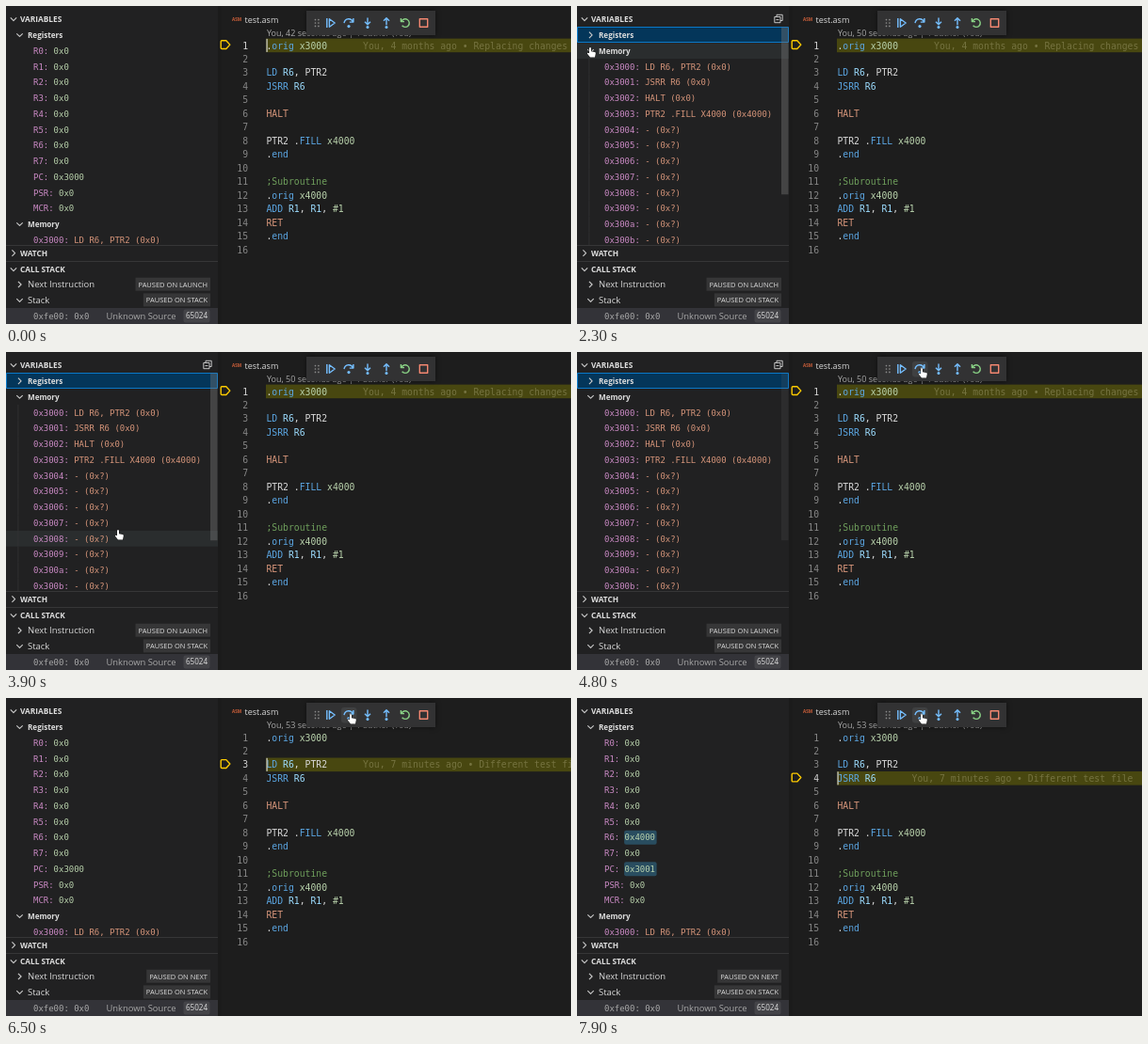
An HTML page with a canvas for the animation above (8000 ms loop, 600x338 px).

```html
<!DOCTYPE html>
<html lang="en">
<head>
<meta charset="utf-8">
<title>Debugger session</title>
<style>
html, body { margin: 0; width: 100%; height: 100%; overflow: hidden; background: #1d1d1d; }
canvas { display: block; width: 600px; height: 338px; }
</style>
</head>
<body>
<canvas id="stage"></canvas>
<script>
const W = 600, H = 338, LOOP = 8000;
const ROW = 16.75, LINE = 14.47, TREE_TOP = 22.5, TREE_BOTTOM = 254;
const MONO = '"DejaVu Sans Mono", "Noto Sans Mono", monospace';
const SANS = '"Open Sans", "Noto Sans", sans-serif';
const CODE_FONT = '9.75px ' + MONO;
const TREE_FONT = '8.97px ' + MONO;
const HEAD_FONT = '700 8.3px ' + SANS;
const UI_FONT = '9.5px ' + SANS;
const COL = {
  side: '#212122', editor: '#1d1d1d', text: '#d8d8d8', dim: '#858585', line: '#363637',
  blue: '#5ba6e2', reg: '#9cdcfe', num: '#b9d2ac', str: '#d6957a', name: '#cb8ac5',
  note: '#6f9f5c', focus: '#0a78c8', icon: '#75beff', gold: '#ffcc00'
};

// Moments of the session, in ms
const T = { focus: 1600, collapse: 1850, step1: 5100, blame1: 5800, step2: 7000, blame2: 7200 };
const PATH = [[700, 110, 345], [1300, 13, 38], [1500, 13, 29], [2050, 13, 29], [2200, 13, 44],
  [2450, 13, 44], [2950, 118, 189], [3900, 118, 189], [4600, 365, 17], [LOOP, 365, 17]];
const SCROLL = [[0, 0], [3000, 38], [3150, 70], [3500, 32], [3700, 0]];

const CODE = [
  [['.', 'text'], ['orig ', 'blue'], ['x3000', 'num']],
  [],
  [['LD ', 'blue'], ['R6', 'reg'], [', PTR2', 'text']],
  [['JSRR ', 'blue'], ['R6', 'reg']],
  [],
  [['HALT', 'str']],
  [],
  [['PTR2 .', 'text'], ['FILL ', 'blue'], ['x4000', 'num']],
  [['.', 'text'], ['end', 'blue']],
  [],
  [[';Subroutine', 'note']],
  [['.', 'text'], ['orig ', 'blue'], ['x4000', 'num']],
  [['ADD ', 'blue'], ['R1', 'reg'], [', ', 'text'], ['R1', 'reg'], [', ', 'text'], ['#1', 'num']],
  [['RET', 'str']],
  [['.', 'text'], ['end', 'blue']],
  []
];
const MEMORY = ['LD R6, PTR2 (0x0)', 'JSRR R6 (0x0)', 'HALT (0x0)', 'PTR2 .FILL X4000 (0x4000)'];
const REGS = ['R0', 'R1', 'R2', 'R3', 'R4', 'R5', 'R6', 'R7', 'PC', 'PSR', 'MCR'];

const canvas = document.getElementById('stage');
const ctx = canvas.getContext('2d');
const ratio = window.devicePixelRatio || 1;
canvas.width = W * ratio;
canvas.height = H * ratio;

function rect(x, y, w, h, color) {
  ctx.fillStyle = color;
  ctx.fillRect(x, y, w, h);
}

function outline(x, y, w, h, color) {
  ctx.strokeStyle = color;
  ctx.lineWidth = 1;
  ctx.strokeRect(x, y, w, h);
}

function rounded(x, y, w, h, r, color) {
  ctx.fillStyle = color;
  ctx.beginPath();
  ctx.roundRect(x, y, w, h, r);
  ctx.fill();
}

function label(str, x, y, font, color, align = 'left') {
  ctx.font = font;
  ctx.fillStyle = color;
  ctx.textAlign = align;
  ctx.fillText(str, x, y);
  return ctx.measureText(str).width;
}

// Strokes an SVG path placed at x, y
function stroke(d, x, y, color, width = 1.3) {
  ctx.save();
  ctx.translate(x, y);
  ctx.strokeStyle = color;
  ctx.lineWidth = width;
  ctx.stroke(new Path2D(d));
  ctx.restore();
}

function dot(x, y, r, color) {
  ctx.fillStyle = color;
  ctx.beginPath();
  ctx.arc(x, y, r, 0, 7);
  ctx.fill();
}

function chevron(x, y, open) {
  stroke(open ? 'M-3.2 -1.6L0 1.6L3.2 -1.6' : 'M-1.6 -3.2L1.6 0L-1.6 3.2', x, y, '#cccccc', 1.1);
}

const ease = u => u * u * (3 - 2 * u);

function pointer(t) {
  if (t < PATH[0][0]) return null;
  const i = PATH.findIndex(p => p[0] > t);
  const [t0, x0, y0] = PATH[i - 1], [t1, x1, y1] = PATH[i];
  const u = ease((t - t0) / (t1 - t0));
  return { x: x0 + (x1 - x0) * u, y: y0 + (y1 - y0) * u };
}

function treeRows(t, collapsed) {
  const rows = [{ head: 'Registers', open: !collapsed }];
  const stepped = t >= T.step2;
  if (!collapsed) {
    for (const name of REGS) {
      const changed = stepped && (name === 'R6' || name === 'PC');
      let value = name === 'PC' ? '0x3000' : '0x0';
      if (changed) value = name === 'PC' ? '0x3001' : '0x4000';
      rows.push({ name, value, color: COL.num, changed });
    }
  }
  rows.push({ head: 'Memory', open: true });
  for (let i = 0; i < 16; i++) {
    rows.push({ name: '0x300' + i.toString(16), value: MEMORY[i] || '- (0x?)', color: COL.str });
  }
  return rows;
}

function drawTree(t, mouse) {
  const collapsed = t >= T.collapse && t < T.step1;
  const rows = treeRows(t, collapsed);
  const scroll = SCROLL.filter(s => s[0] <= t).pop()[1];
  const inside = mouse && mouse.x < 225 && mouse.y > TREE_TOP && mouse.y < TREE_BOTTOM;
  const view = TREE_BOTTOM - TREE_TOP;

  ctx.save();
  ctx.beginPath();
  ctx.rect(0, 22, 226, TREE_BOTTOM - 22);
  ctx.clip();
  rows.forEach((row, i) => {
    const top = TREE_TOP + i * ROW - scroll, mid = top + ROW / 2;
    if (collapsed && i === 0) {
      rect(0, top, 225, ROW - .5, '#04365a');
      outline(.5, top, 224, ROW - .75, COL.focus);
    } else if (inside && mouse.y + 4 >= top && mouse.y + 4 < top + ROW) {
      rect(0, top, 225, ROW, '#2a2d2e');
    }
    if (row.head) {
      chevron(14.5, mid, row.open);
      label(row.head, 23, mid + 3, '700 8.1px ' + SANS, '#dedede');
      return;
    }
    if (inside) rect(12.5, top, .8, ROW, '#333334');
    const x = 29 + label(row.name + ': ', 29, mid + 3.3, TREE_FONT, COL.name);
    if (row.changed) rounded(x - .5, mid - 7.5, 34.5, 15, 2, '#294d60');
    label(row.value, x, mid + 3.3, TREE_FONT, row.color);
  });
  ctx.restore();

  if (t >= 1300 && t < T.step1) {
    const total = rows.length * ROW;
    rect(217, TREE_TOP + scroll * view / total, 7.5, view * view / total,
      inside ? 'rgba(121,121,121,.4)' : 'rgba(121,121,121,.12)');
  }
  if (t >= T.focus && t < T.collapse) outline(.5, 22.5, 224, 231, COL.focus);
}

function sectionHead(name, y, open) {
  chevron(8, y, open);
  label(name, 15, y + 3, HEAD_FONT, '#dedede');
}

function badge(str, y) {
  ctx.font = '7.5px ' + SANS;
  const w = ctx.measureText(str).width;
  rect(211 - w, y - 7, w + 6, 14, '#363637');
  label(str, 214, y + 2.8, '7.5px ' + SANS, '#dadada', 'right');
}

function drawSidebar(t, mouse) {
  rect(0, 0, 225, H, COL.side);
  drawTree(t, mouse);
  sectionHead('VARIABLES', 14, true);
  if (t >= 1300 && t < T.step1) {
    stroke('M-2 -2V-4.2H4.2V2H2M-4.2 -2H2V4.2H-4.2ZM-2.6 1.1H.4', 214, 13.5, '#c5c5c5', 1);
  }
  rect(0, 254, 225, 1, COL.line);
  sectionHead('WATCH', 262.6, false);
  rect(0, 271, 225, 1, COL.line);
  sectionHead('CALL STACK', 280, true);

  chevron(14.5, 296, false);
  label('Next Instruction', 23, 299.4, UI_FONT, COL.text);
  badge(t < T.step1 ? 'PAUSED ON LAUNCH' : 'PAUSED ON NEXT', 295.7);
  chevron(14.5, 312.8, true);
  label('Stack', 23, 316.2, UI_FONT, COL.text);
  badge('PAUSED ON STACK', 312.4);

  rect(0, 321, 225, 17, '#333338');
  label('0xfe00: 0x0', 29, 333, TREE_FONT, '#a8a8a8');
  label('Unknown Source', 106.5, 333, '9.4px ' + SANS, '#a8a8a8');
  rounded(188.5, 322.5, 28, 14, 2, '#444448');
  label('65024', 202.5, 332.4, '8.1px ' + SANS, '#dedede', 'center');
  rect(225, 0, 4, H, '#1b1b1b');
}

function drawEditor(t) {
  rect(229, 0, W - 229, H, COL.editor);
  label('ASM', 240, 16, '700 4.6px ' + SANS, '#d0603a');
  label('test.asm', 253.5, 17.5, '9px ' + SANS, COL.text);
  const age = t < T.collapse ? 42 : t < T.step1 ? 50 : 53;
  label(`You, ${age} seconds ago | 1 author (You)`, 277, 31.7, '9px ' + SANS, '#a6a6a6');

  const active = t < T.step1 ? 1 : t < T.step2 ? 3 : 4;
  const caret = t < T.focus || t >= T.step1;
  CODE.forEach((parts, i) => {
    const n = i + 1, mid = 41.9 + i * LINE, base = mid + 3.6;
    const here = n === active;
    if (here) {
      rect(276, mid - 7.3, W - 276, 14.6, '#484710');
      stroke('M-4.6 -3.4Q-4.6 -4.4 -3.6 -4.4H1L5 0L1 4.4H-3.6Q-4.6 4.4 -4.6 3.4Z',
        232.8, mid - .8, COL.gold, 1.4);
    }
    label(String(n), 257, base, CODE_FONT, here ? '#d0d0d0' : COL.dim, 'right');
    let x = 276.5;
    for (const [str, color] of parts) x += label(str, x, base, CODE_FONT, COL[color]);
    if (!here) return;
    if (caret) rect(276.5, mid - 7, 1.2, 14, '#d0d0d0');
    const shown = n === 1 || t >= (n === 3 ? T.blame1 : T.blame2);
    const blame = n === 1 ? 'You, 4 months ago • Replacing changes'
      : 'You, 7 minutes ago • Different test file';
    if (shown) label(blame, x + 38, base, CODE_FONT, '#757340');
  });
}

function drawToolbar(mouse) {
  ctx.save();
  ctx.shadowColor = 'rgba(0,0,0,.5)';
  ctx.shadowBlur = 5;
  rect(319, 5, 137, 26, '#323233');
  ctx.restore();
  if (mouse && mouse.y < 31 && Math.abs(mouse.x - 364) < 9) {
    rounded(356, 10, 16.5, 16.5, 3, '#3f4041');
  }
  for (let i = 0; i < 6; i++) dot(328.5 + i % 2 * 3.4, 14.6 + (i >> 1) * 3.4, .85, '#8a8a8a');
  stroke('M-4.2 -5V5M-1.6 -4.2L4.2 0L-1.6 4.2Z', 345, 18, COL.icon, 1.4);
  stroke('M-5 .6C-4 -5 3 -5 4.4 -.6M4.9 -4.6V-.4H.8', 364, 17.5, COL.icon, 1.4);
  dot(364, 21.6, 1.6, COL.icon);
  stroke('M0 -5.4V2M-3 -1L0 2L3 -1', 384, 17.8, COL.icon, 1.4);
  dot(384, 22.6, 1.5, COL.icon);
  stroke('M0 2.4V-5M-3 -2L0 -5L3 -2', 404, 17.8, COL.icon, 1.4);
  dot(404, 22.6, 1.5, COL.icon);
  stroke('M-4 -1.6A4.3 4.3 0 1 1 -3.4 2.8M-4.6 -5V-1.4H-1', 424, 18, '#89d185', 1.4);
  stroke('M-4.2 -4.2H4.2V4.2H-4.2Z', 443.5, 18, '#f48771', 1.4);
}

function drawPointer(m) {
  const onTools = m.y < 31 && m.x > 319 && m.x < 456;
  if (m.x > 225 && !onTools) {
    stroke('M-2 -5H2M0 -5V5M-2 5H2', m.x, m.y, '#e8e8e8', 1);
    return;
  }
  const hand = new Path2D('M0 .8Q1 -.6 2 .8V4.2L6 5Q7 5.3 6.8 6.5L6 10.5H1L-2.2 6.5Q-2 5 0 6.2Z');
  ctx.save();
  ctx.translate(m.x, m.y);
  ctx.fillStyle = '#ffffff';
  ctx.strokeStyle = '#111111';
  ctx.lineWidth = 1;
  ctx.stroke(hand);
  ctx.fill(hand);
  ctx.restore();
}

function draw(t) {
  ctx.setTransform(ratio, 0, 0, ratio, 0, 0);
  ctx.lineJoin = 'round';
  const mouse = pointer(t);
  drawSidebar(t, mouse);
  drawEditor(t);
  drawToolbar(mouse);
  if (mouse) drawPointer(mouse);
}

const start = performance.now();
function frame() {
  draw((performance.now() - start) % LOOP);
  requestAnimationFrame(frame);
}
frame();
</script>
</body>
</html>
```
